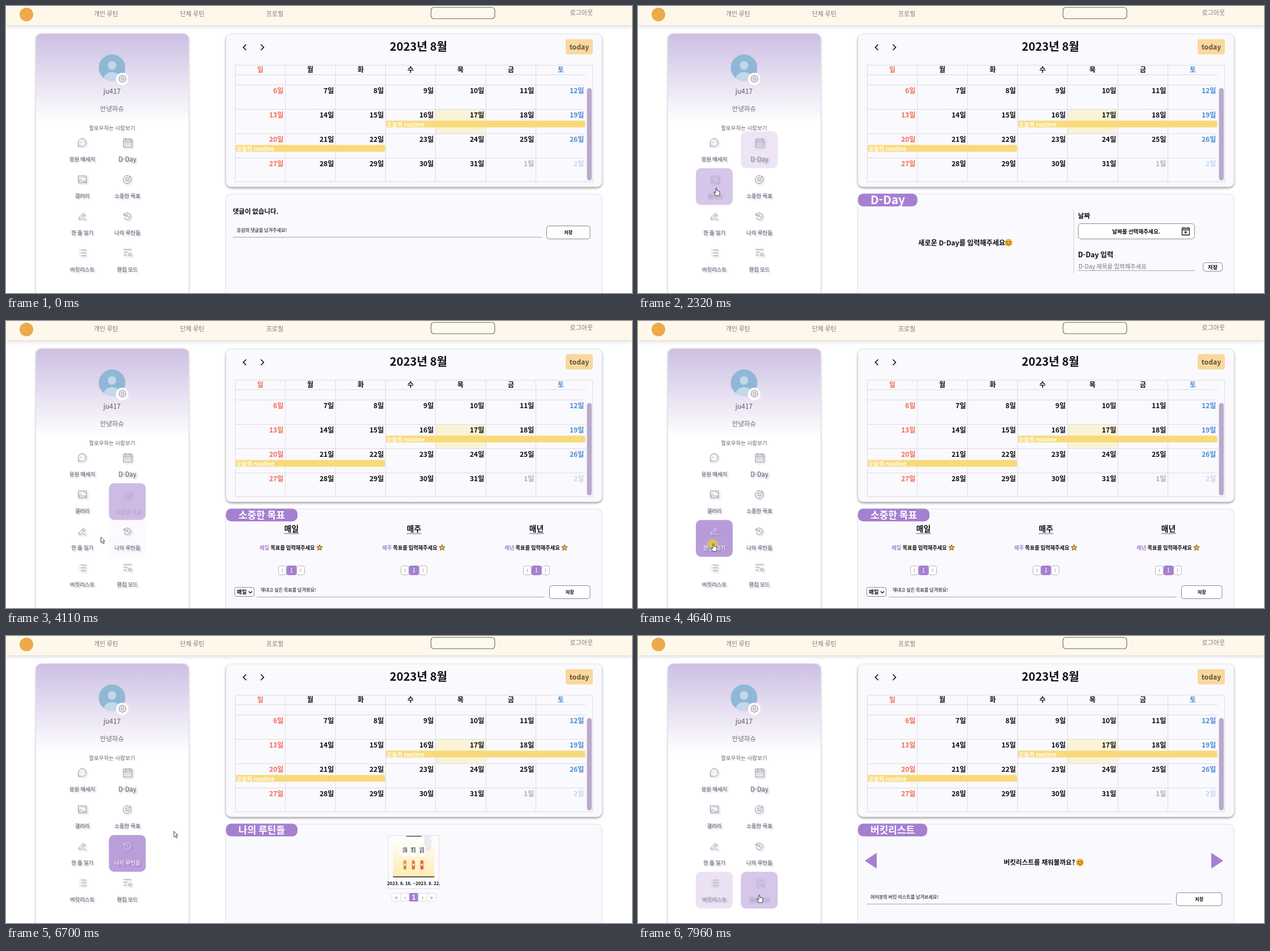
Animation, 1104 px wide and 507 px high, one loop 8000 ms. Source, as an HTML page with a canvas:

```html
<!DOCTYPE html>
<html lang="ko">
<head>
<meta charset="utf-8">
<title>루틴</title>
<style>
html, body { margin: 0; width: 100%; height: 100%; overflow: hidden; background: #fff; }
canvas { display: block; }
</style>
</head>
<body>
<canvas id="stage" width="1104" height="507"></canvas>
<script>
const c = document.getElementById('stage').getContext('2d');
const LOOP = 8000, FADE = 300, CLICK = 150, TILE = 65;
const FONT = '"Noto Sans CJK KR", "Noto Sans CJK", sans-serif';
const PURPLE = '#a680d0', INK = '#0d0d0f', CARD = '#faf9fd', RULE = '#dcdbe1', EDGE = '#8b8a90';

function text(s, x, y, size, color = INK, align = 'left', weight = 700) {
  c.font = `${weight} ${size}px ${FONT}`;
  c.textAlign = align;
  c.fillStyle = color;
  c.fillText(s, x, y + size * 0.37);
}
function box(x, y, w, h, r, fill, stroke, lw = 1) {
  c.beginPath();
  c.roundRect(x, y, w, h, r);
  if (fill) { c.fillStyle = fill; c.fill(); }
  if (stroke) { c.strokeStyle = stroke; c.lineWidth = lw; c.stroke(); }
}
function disc(x, y, r, fill) {
  c.beginPath();
  c.arc(x, y, r, 0, 7);
  c.fillStyle = fill;
  c.fill();
}
function line(x1, y1, x2, y2, color, lw = 1) {
  c.beginPath();
  c.moveTo(x1, y1);
  c.lineTo(x2, y2);
  c.strokeStyle = color;
  c.lineWidth = lw;
  c.stroke();
}
function path(d, x, y, stroke, lw = 1, fill) {
  c.save();
  c.translate(x, y);
  const p = new Path2D(d);
  if (fill) { c.fillStyle = fill; c.fill(p); }
  if (stroke) { c.strokeStyle = stroke; c.lineWidth = lw; c.stroke(p); }
  c.restore();
}
// closed or open curve r(angle) around a centre
function polar(x, y, n, radius) {
  c.beginPath();
  for (let k = 0; k < n; k++) {
    const a = k / n * 2 * Math.PI - Math.PI / 2, r = radius(k, a);
    c.lineTo(x + r * Math.cos(a), y + r * Math.sin(a));
  }
  c.closePath();
}
function shadow(color, blur, dx, dy, draw) {
  c.save();
  c.shadowColor = color;
  c.shadowBlur = blur;
  c.shadowOffsetX = dx;
  c.shadowOffsetY = dy;
  draw();
  c.restore();
}
function gradient(y1, y2, from, to) {
  const g = c.createLinearGradient(0, y1, 0, y2);
  g.addColorStop(0, from);
  g.addColorStop(1, to);
  return g;
}
const mix = (a, b, p) => `rgb(${a.map((v, i) => Math.round(v + (b[i] - v) * p))})`;
const clamp = x => Math.max(0, Math.min(1, x));

// the CSS "ease" curve, solved by bisection
function ease(x) {
  let lo = 0, hi = 1, u = clamp(x);
  if (u === 0 || u === 1) return u;
  for (let i = 0; i < 16; i++) {
    u = (lo + hi) / 2;
    if (0.75 * u * (1 - u) + u ** 3 < x) lo = u; else hi = u;
  }
  return 0.3 * u * (1 - u) ** 2 + 3 * u * u * (1 - u) + u ** 3;
}

const MENU = [
  { label: '응원 메세지', icon: 'M7 0a7 7 0 1 1-4 13L0 14V7A7 7 0 0 1 7 0M4 7h1M7 7h1M10 7h1', view: comments },
  { label: 'D-Day', icon: 'M0 1h15v14H0zM0 5h15M4-1v4M11-1v4M3 8h2M7 8h2M11 8h2M3 11h2M7 11h2M11 11h2', view: dday },
  { label: '갤러리', icon: 'M0 1h14v12H0zM0 11l4-4 4 4 2-2 4 3M9 4h2', view: gallery },
  { label: '소중한 목표', icon: 'M13 5a7 7 0 1 1-4-4M10 7a3 3 0 1 1-3-3M7 7l5-5M11 0v3h3', view: goals },
  { label: '한 줄 일기', icon: 'M1 10L9 2l3 3L4 13H1zM7 4l3 3M8 13h6', view: diary },
  { label: '나의 루틴들', icon: 'M1 2v4h4M1 6a6 6 0 1 1 0 3M7 4v4l3 1', view: routines },
  { label: '버킷리스트', icon: 'M4 2h10M4 7h10M4 12h10M1 2h1M1 7h1M1 12h1', view: bucket },
  { label: '편집 모드', icon: 'M0 1h14M0 6h7M0 11h6M9 10a2 2 0 1 0 5 0a2 2 0 1 0-5 0' }
];
const tileX = i => 102 + i % 2 * 79.5;
const tileY = i => 221.5 + (i >> 1) * TILE;
const inside = (v, from) => v >= from && v < from + TILE;
const tileAt = ([x, y]) => MENU.findIndex((_, i) => inside(x, tileX(i)) && inside(y, tileY(i)));

// pointer moves: departure, arrival, x, y
const MOVES = [
  [0, 70, 690, 455], [70, 600, 131, 262], [1502, 1682, 205, 262], [2130, 2290, 138, 321],
  [2780, 3175, 204, 329], [4000, 4200, 138, 424], [4280, 4380, 133, 393], [4970, 5260, 176, 399],
  [5690, 5700, 257, 394], [6040, 6250, 214, 384], [6680, 6700, 296, 345], [6900, 7280, 138, 452],
  [7780, 7920, 214, 457]
];
const CLICKS = [1800, 2700, 3700, 4630, 6350, 7390];

function pointer(t) {
  let [, , x, y] = MOVES[0];
  for (const [from, to, nx, ny] of MOVES) {
    const p = clamp((t - from) / (to - from));
    x += (nx - x) * p;
    y += (ny - y) * p;
  }
  return [x, y];
}
// every stay of the pointer on a tile
const visits = [];
for (let t = 0, last = -1; t <= LOOP; t += 2) {
  const tile = tileAt(pointer(t));
  if (tile !== last && last >= 0) visits[visits.length - 1].off = t;
  if (tile !== last && tile >= 0) visits.push({ tile, on: t, off: Infinity });
  last = tile;
}
function glow(tile, t) {
  const levels = visits.filter(v => v.tile === tile).map(v =>
    ease((Math.min(t, v.off) - v.on) / FADE) * (1 - ease((t - v.off) / FADE)));
  return Math.max(0, ...levels);
}

function header() {
  shadow('rgba(0,0,0,.16)', 7, 0, 2, () => box(0, -4, 1104, 38, 0, '#fef8eb'));
  disc(36, 15, 12, '#eda94a');
  const gray = '#7f7a73';
  ['개인 루틴', '단체 루틴', '프로필'].forEach((s, i) => text(s, 155 + i * 152, 13.5, 11, gray, 'left', 500));
  text('로그아웃', 1035, 12, 11, gray, 'right', 500);
  box(749.5, 2.5, 112.5, 20, 5, '#fef9ee', '#77736c', 1.2);
}

function profile() {
  shadow('rgba(60,50,90,.4)', 4, 0, 1, () => box(53, 49, 269, 480, 9, '#fff'));
  box(53, 49, 269, 480, 9, gradient(49, 207, '#cdbfe3', '#ffffff'));
  c.save();
  c.beginPath();
  c.arc(187, 109, 23.5, 0, 7);
  c.clip();
  box(160, 80, 54, 60, 0, '#90b8d6');
  disc(187, 105, 7.5, '#c3d9ea');
  box(172, 117, 30, 30, 14, '#c3d9ea');
  c.restore();
  disc(205, 129, 11, '#fff');
  polar(205.5, 128.5, 64, (k, a) => 5.8 + 0.9 * Math.tanh(3 * Math.cos(8 * a)));
  c.moveTo(208, 128.5);
  c.arc(205.5, 128.5, 2.5, 0, 7);
  c.strokeStyle = '#777487';
  c.lineWidth = 1;
  c.stroke();
  text('ju417', 187, 150.5, 12, '#5f5a6b', 'center', 400);
  text('안녕하슈', 187, 181.5, 11.5, '#686470', 'center', 400);
  text('팔로우하는 사람보기', 187, 215.5, 9.6, '#68656d', 'center', 400);
}

function menu(t) {
  MENU.forEach(({ label, icon }, i) => {
    const p = glow(i, t), x = tileX(i), y = tileY(i), cx = x + TILE / 2;
    c.globalAlpha = p;
    box(x, y, TILE, TILE, 9, '#b89cd9');
    c.globalAlpha = 1;
    shadow('rgba(80,70,120,.45)', 3, 2, 2, () => {
      path(icon, cx - 7, y + 12.5, mix([150, 145, 163], [236, 228, 245], p));
      const color = mix([86, 86, 104], [255, 255, 255], p);
      text(label, cx, y + 49, label === 'D-Day' ? 11.2 : 9.5, color, 'center', 500);
    });
  });
}

function calendar() {
  shadow('rgba(50,45,60,.55)', 4, 0, 2, () => box(388, 49.5, 663, 270, 9, CARD));
  box(388, 49.5, 663, 270, 9, null, '#e4e2e9', 0.7);
  path('M4 0L-1 5L4 10M30 0L35 5L30 10', 419.5, 68, '#111', 1.7);
  text('2023년 8월', 727.5, 72, 20.2, INK, 'center');
  box(987, 58.5, 48, 27, 4, '#fad89b');
  text('today', 1011, 72, 12.2, '#5e5143', 'center');

  const colX = d => 404.5 + Math.round(88.3 * d);
  const rowY = w => 139.5 + 43 * w;
  const tint = d => (d === 0 ? '#f56a57' : d === 6 ? '#4b8ad6' : INK);
  box(colX(4), rowY(1), 88, 43, 0, '#faf3d8');
  for (const y of [104.5, 310.5]) line(404, y, 1035, y, RULE);
  for (const y of [121.5, ...[0, 1, 2, 3].map(rowY)]) line(404, y, 1022, y, RULE);
  for (let d = 0; d < 7; d++) {
    line(colX(d), 104, colX(d), 311, RULE);
    text('일월화수목금토'[d], colX(d + 0.5), 113, 12, tint(d), 'center');
  }
  line(1034.5, 104, 1034.5, 311, RULE);
  for (let k = 0; k < 28; k++) {
    const d = k % 7, day = k + 6, next = day > 31;
    c.globalAlpha = next ? 0.3 : 1;
    text((next ? day - 31 : day) + '일', colX(d + 1) - 3, rowY(k / 7 | 0) + 9.5, 12.2, tint(d), 'right');
  }
  c.globalAlpha = 1;
  for (const [week, from, to] of [[1, 3, 7], [2, 0, 3]]) {
    const x = colX(from) + 1, y = rowY(week) + 20;
    box(x, y, colX(to) - x - 1, 12, 1.5, '#f9da7a');
    text('오늘의 routine', x + 1, y + 6.5, 10.1, '#fff');
  }
  box(1024.5, 145, 8.5, 163, 4.2, '#b9a9cb');
}

function tab(label, size = 17) {
  c.font = `700 ${size}px ${FONT}`;
  box(388, 331.5, c.measureText(label).width + 44, 22.5, 9, PURPLE);
  text(label, 410, 342.5, size, '#fff');
}
function button(x, y, w, h, size) {
  box(x + 0.5, y + 0.5, w - 1, h - 1, 4, '#fff', EDGE);
  text('저장', x + w / 2, y + h / 2, size, INK, 'center');
}
// one-line input with its save button
function entry(hint, x1, x2, y) {
  text(hint, x1 + 7, y - 12, 8.1, '#55545a');
  line(x1, y + 0.5, x2, y + 0.5, '#a5a4aa');
  button(x2 + 8, y - 20, 1022.5 - x2, 24, 8.2);
}
function smile(x, y) {
  disc(x, y, 6.8, '#f5b63f');
  path('M-4-1q1-2 3 0M1-1q1-2 3 0M-4 1q4 5 8 0', x, y, '#4f3212', 1.1);
}

function comments() {
  text('댓글이 없습니다.', 400, 362.5, 11.5);
  entry('응원의 댓글을 남겨주세요!', 400, 945, 408);
}
function dday() {
  tab('D-Day', 20.5);
  text('새로운 D-Day를 입력해주세요', 494, 418, 12.2);
  smile(653.5, 418);
  line(768.5, 360, 768.5, 473, '#d0cfd6');
  text('날짜', 776, 370.5, 11.5);
  box(776.5, 384.5, 205, 27, 5, '#fff', EDGE);
  text('날짜를 선택해주세요.', 878.5, 398, 9.6, INK, 'center');
  path('M0 1h13v12H0zM0 4h13M3-1v2M10-1v2M6 6v5M4 8h5', 959.5, 391.5, '#111', 1.3);
  text('D-Day 입력', 776, 439.5, 12.4);
  text('D-Day 제목을 입력해주세요', 777, 460, 10.4, '#77767c', 'left', 400);
  line(776, 467.5, 982, 467.5, '#a5a4aa');
  button(996, 453, 35, 16, 9.6);
}
function gallery() {
  tab('갤러리');
  c.save();
  box(393, 356, 52, 54, [0, 0, 7, 7], gradient(360, 408, '#fffefa', '#fdebb6'));
  c.clip();
  text('하루의 기록을 남겨요', 417, 356, 5, '#333', 'center');
  for (const x of [391, 447]) disc(x, 374, 7, '#fff');
  box(399, 364, 36, 19, 8, '#fff');
  ['매일 작은 계획을', '꾸준히 응원해요'].forEach((s, i) => text(s, 417, 372 + i * 5, 4.2, '#333', 'center'));
  line(397, 408.7, 441, 408.7, '#4a4038', 1.4);
  c.restore();
  disc(416.5, 394, 6.8, '#eea03c');
  path('M-4-2l3 1M4-2l-3 1M-2 4q2-4 4 0', 416.5, 394, '#6b3a12', 1.2);
}
function star(x, y) {
  polar(x, y, 10, k => (k % 2 ? 2.5 : 5.4));
  c.fillStyle = '#f7b733';
  c.fill();
  c.strokeStyle = '#5b4420';
  c.lineWidth = 0.9;
  c.stroke();
}
function goals() {
  tab('소중한 목표');
  ['매일', '매주', '매년'].forEach((s, i) => {
    const x = 503.5 + i * 216;
    text(s, x, 367, 13.8, INK, 'center');
    line(x - 13, 375.5, x + 13, 375.5, PURPLE, 1.6);
    text(s, x - 56, 400.5, 9.2, PURPLE);
    text('목표를 입력해주세요', x - 37, 400.5, 9.2);
    star(x + 49.5, 400.5);
    for (const dx of [-23, 9]) box(x + dx, 432.5, 14, 16, 4, '#fff', '#b5b3bb');
    box(x - 9, 432, 18, 17, 4, PURPLE);
    text('1', x, 440.5, 10, '#fff', 'center', 400);
    path('M-15-3l-2 3 2 3M15-3l2 3-2 3', x, 440.5, '#98969e');
  });
  box(403.5, 470.5, 34, 16, 3, '#fff', EDGE);
  text('매일', 407, 478.5, 9.6);
  path('M0 0l3 3 3-3', 428, 477.5, '#111', 1.4);
  entry('해내고 싶은 목표를 남겨봐요!', 442, 950, 487);
}
function diary() {
  tab('한 줄 일기');
  text('오늘의 일기를 남겨볼까요?', 711, 412, 11.6, INK, 'center');
  entry('오늘 하루를 한 줄로 남겨보세요!', 403, 945, 494);
}
function routines() {
  tab('나의 루틴들');
  box(674.5, 352.5, 89, 94, 0, '#fcfbfe', '#e2e0e8');
  box(682.5, 353, 73, 73, 0, gradient(358, 420, '#fffefb', '#feecba'));
  box(737, 353, 13, 27, [0, 0, 6, 6], '#edebf0');
  box(706, 353, 27, 1.5, 0, '#555');
  ['아침 산책', '매일 독서', '하루 물컵'].forEach((s, i) => {
    const x = 703.5 + i * 15;
    box(x - 6, 370, 12, 19, 3, '#fff');
    s.split(' ').forEach((word, k) => text(word, x, 375.5 + k * 5, 4.5, '#333', 'center'));
    box(x - 2.7, 396, 5.4, 17, 2.7, `hsl(${34 - i * 9} 78% 57%)`);
    disc(x, 404, 1.8, '#fff0cf');
    disc(x, 409, 1, '#a5483a');
  });
  line(682.5, 425.5, 755.5, 425.5, '#26221e', 1.3);
  text('2023. 8. 16. ~2023. 8. 22.', 719, 437.5, 7.9, INK, 'center');
  [...'«‹1›»'].forEach((s, i) => {
    const x = 680.5 + i * 15.5, on = s === '1';
    box(x, 454.5, 15.5, 14, 1, on ? PURPLE : '#fff', on ? PURPLE : RULE);
    text(s, x + 7.7, 461.5, 11.5, on ? '#fff' : '#77757e', 'center', on ? 700 : 400);
  });
}
function bucket() {
  tab('버킷리스트');
  path('M400 397l21-14v28zM1032 397l-21-14v28z', 0, 0, null, 0, PURPLE);
  text('버킷리스트를 채워볼까요?', 645, 400, 11.6);
  smile(779.5, 400);
  entry('여러분의 버킷 리스트를 남겨보세요!', 403, 941, 473);
}

function panel(t) {
  shadow('rgba(60,50,90,.35)', 3, 0, 0, () => box(388, 333, 662.5, 200, 9, CARD));
  const last = CLICKS.filter(at => t >= at + CLICK).pop();
  MENU[last ? tileAt(pointer(last)) : 0].view();
}

const HAND = 'M-1 1Q0-1 1 1V5l4 1q2 0 1 2V11l-1 3H-1L-4 9q-1-2 1-1L-1 9z';
const ARROW = 'M0 0V10l2-2 2 4 2-1L4 7h3z';
function cursor(t) {
  if (t < MOVES[0][1]) return;
  const [x, y] = pointer(t);
  if (CLICKS.some(at => t >= at && t < at + CLICK)) disc(x - 1.5, y + 1, 9, 'rgba(226,198,62,.85)');
  path(tileAt([x, y]) < 0 ? ARROW : HAND, x, y, '#2c2b30', 0.9, '#fff');
}

const start = performance.now();
function tick() {
  const t = (performance.now() - start) % LOOP;
  c.fillStyle = '#fff';
  c.fillRect(0, 0, 1104, 507);
  header();
  profile();
  menu(t);
  calendar();
  panel(t);
  cursor(t);
  requestAnimationFrame(tick);
}
tick();
</script>
</body>
</html>
```
